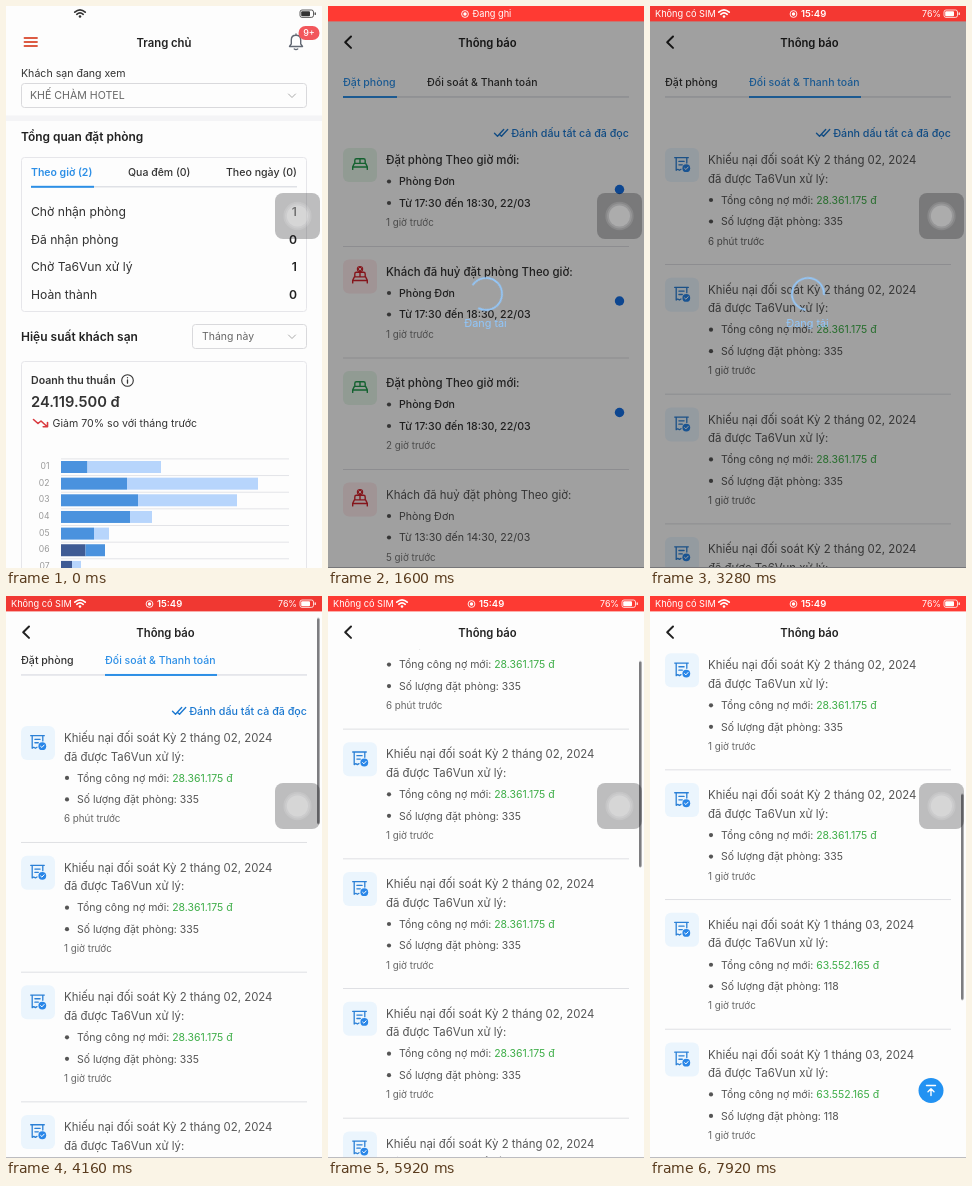
An HTML page that plays this animation: 316 px wide and 562 px high, repeating every 8000 ms.

```html
<!DOCTYPE html>
<html lang="vi">
<head>
<meta charset="utf-8">
<title>Thông báo</title>
<style>
@property --s { syntax: "<number>"; inherits: true; initial-value: 0; }
html, body { margin: 0; width: 100%; height: 100%; overflow: hidden; background: #fdfdfd; }
svg { display: block; width: 316px; height: 562px; font-family: Inter, "Noto Sans", sans-serif; fill: #333; animation: scroll 8s linear infinite; }
svg g, svg rect, svg text { animation: 0s linear infinite; }
.line { fill: none; stroke-linecap: round; stroke-linejoin: round; }

svg .home { animation: home 8s infinite; }
svg .page { animation: page 8s infinite; }
svg .feed { transform: translateY(calc(var(--s) * -1px)); }
svg .thumb { transform: translateY(calc(var(--s) * .381px)); animation: thumb 8s step-end infinite; }
svg .bookings { animation: bookings 8s step-end infinite; }
svg .claims { animation: claims 8s step-end infinite; }
svg .veil { animation: veil 8s step-end infinite; }
svg .ring { transform-origin: 158px 288px; animation: spin 1s linear infinite; }
svg .tab1 { animation: tab1 8s linear infinite; }
svg .tab2 { animation: tab2 8s linear infinite; }
svg .ink { animation: ink 8s infinite; }
svg .bar { animation: bar 8s ease-in-out infinite; }
svg .plain { animation: plain 8s linear infinite; }
svg .rec { animation: rec 8s linear infinite; }
svg .clock { animation: clock 8s step-end infinite; }
svg .top { animation: top 8s step-end infinite; }

@keyframes scroll {
  0%, 48% { --s: 0; }
  52% { --s: 12; animation-timing-function: cubic-bezier(.4,.22,.72,.62); }
  74% { --s: 125.2; }
  85% { --s: 292.4; }
  99% { --s: 473.6; }
  100% { --s: 486; }
}
@keyframes home {
  0%, 8% { transform: none; animation-timing-function: ease-out; }
  12.5%, 100% { transform: translateX(-95px); }
}
@keyframes page {
  0%, 8% { transform: translateX(316px); animation-timing-function: ease-out; }
  12.5%, 100% { transform: none; }
}
@keyframes thumb { 0% { opacity: 0; } 47% { opacity: 1; } }
@keyframes bookings { 0% { opacity: 0; } 15% { opacity: 1; } 36%, 100% { opacity: 0; } }
@keyframes claims { 0% { opacity: 0; } 41%, 100% { opacity: 1; } }
@keyframes veil { 0% { opacity: 0; } 13% { opacity: 1; } 21.5% { opacity: 0; } 36% { opacity: 1; } 43%, 100% { opacity: 0; } }
@keyframes spin { to { transform: rotate(360deg); } }
@keyframes tab1 { 0%, 34% { fill: #2d8fe6; } 37%, 100% { fill: #333; } }
@keyframes tab2 { 0%, 31% { fill: #333; } 33%, 100% { fill: #2d8fe6; } }
@keyframes ink {
  0%, 34% { x: 15px; width: 54px; animation-timing-function: ease-in-out; }
  37%, 100% { x: 99px; width: 112px; }
}
/* white at first, then the red of a running recording, pulsing */
@keyframes bar {
  0%, .9% { fill: #fdfdfd; }
  7%, 20%, 46%, 72%, 98%, 100% { fill: #ff3a33; }
  33%, 59%, 85% { fill: #dc3531; }
}
@keyframes plain { 0%, .9% { opacity: 1; } 5%, 100% { opacity: 0; } }
@keyframes rec { 0%, 2% { opacity: 0; } 6%, 35.9% { opacity: 1; } 36%, 100% { opacity: 0; } }
@keyframes clock { 0% { opacity: 0; } 36%, 100% { opacity: 1; } }
@keyframes top { 0% { opacity: 0; } 90%, 100% { opacity: 1; } }
</style>
</head>
<body>
<svg id="stage" viewBox="0 0 316 562"></svg>
<script>
const BLUE = '#2d8fe6', LINK = '#1b78d0', GREY = '#555', GREEN = '#3fae49';

// y is the middle of the capitals
const text = (x, y, size, str, attrs = '') =>
  `<text x="${x}" y="${(y + size * .36).toFixed(2)}" font-size="${size}" ${attrs}>${str}</text>`;
const rect = (x, y, w, h, fill, attrs = '') =>
  `<rect x="${x}" y="${y}" width="${w}" height="${h}" fill="${fill}" ${attrs}/>`;
const disc = (x, y, r, fill, attrs = '') =>
  `<circle cx="${x}" cy="${y}" r="${r}" fill="${fill}" ${attrs}/>`;
const line = (d, stroke, w = 1, attrs = '') =>
  `<path class="line" d="${d}" stroke="${stroke}" stroke-width="${w}" ${attrs}/>`;
const group = (cls, ...parts) => `<g class="${cls}">${parts.join('')}</g>`;
const move = (x, y, ...parts) => `<g transform="translate(${x} ${y})">${parts.join('')}</g>`;
const box = (x, y, w, h, stroke) => rect(x + .5, y + .5, w, h, 'none', `rx="3" stroke="${stroke}"`);
const W5 = 'font-weight="500"', W6 = 'font-weight="600"', END = 'text-anchor="end"', MID = 'text-anchor="middle"';

const wifi = c => line('M68.8 6.2q5.2-4.6 10.4 0M70.8 8.3q3.2-2.8 6.4 0', c, 1.7) + disc(74, 10.5, 1.3, c);
const battery = c => rect(294, 4, 13.5, 7.4, 'none', `rx="2" stroke="${c}" stroke-width=".8"`) +
  rect(295.2, 5.2, 8.8, 5, c, 'rx="1"') + rect(308.6, 6.3, 1.2, 2.8, c, 'rx=".6"');
const record = x => disc(x, 8, 3.4, 'none', 'stroke="#fff" stroke-width=".9"') + disc(x, 8, 1.7, '#fff');

function home() {
  const rows = [['Chờ nhận phòng', 1], ['Đã nhận phòng', 0], ['Chờ Ta6Vun xử lý', 1], ['Hoàn thành', 0]];
  // start colour end, then second colour end
  const bars = [[81.5, 155], [121, 252], [132, 231], [124, 146], [88, 103], [79.5, 99], [66, 75]];
  const dark = '#3f5b94', mid = '#4a92de', pale = '#b7d5fc';
  return group('home',
    rect(0, 0, 316, 562, '#fdfdfd'),
    line('M18.5 32h12.5M18.5 36h12.5M18.5 40h12.5', '#dc5b43', 1.8),
    text(158, 36.5, 11.3, 'Trang chủ', `${W6} ${MID} fill="#222"`),
    line('M283.5 40.5h13l-1.8-2.6v-4q0-4.6-4.7-4.6t-4.7 4.6v4zM288.3 43q1.7 1.3 3.4 0M290 29.3v-1.3', '#626873', 1.4),
    rect(292.5, 20, 21, 14, '#f2575c', 'rx="7"'),
    text(303, 27, 9, '9+', `${MID} ${W5} fill="#fff"`),
    text(15, 67.5, 10.6, 'Khách sạn đang xem'),
    box(15, 77, 285, 24, '#d9d9dc'),
    text(24, 89.5, 10.6, 'KHẾ CHÀM HOTEL', 'fill="#666"'),
    line('M282.5 88l3.5 3.5 3.5-3.5', '#aaa'),
    rect(0, 109.5, 316, 5.5, '#f4f4f6'),
    text(15, 131, 11.95, 'Tổng quan đặt phòng', `${W6} fill="#222"`),
    box(15, 151, 285, 154, '#e6e6ea'),
    text(25, 166.5, 10.5, 'Theo giờ (2)', `${W6} fill="${BLUE}"`),
    text(122, 166.5, 10.5, 'Qua đêm (0)', W5),
    text(291, 166.5, 10.6, 'Theo ngày (0)', `${W5} ${END}`),
    rect(25, 180, 266, 1.5, '#dfe1e6'),
    rect(25, 179.8, 63, 2, BLUE),
    ...rows.map(([label, n], i) => text(25, 206 + 27.4 * i, 12.15, label) +
      text(291, 206 + 27.4 * i, 12.15, n, `${W6} ${END} fill="#222"`)),
    text(15, 331, 12, 'Hiệu suất khách sạn', `${W6} fill="#222"`),
    box(186, 318, 114, 24, '#d9d9dc'),
    text(196, 330.5, 10.45, 'Tháng này', 'fill="#666"'),
    line('M282.5 329l3.5 3.5 3.5-3.5', '#aaa'),
    box(15, 355, 285, 240, '#e6e6ea'),
    text(25, 374.5, 10.6, 'Doanh thu thuần', W6),
    disc(121.5, 374.5, 5.8, 'none', 'stroke="#333" stroke-width="1.1"'),
    line('M121.5 374v3.2M121.5 371.6v.1', '#333', 1.3),
    text(25, 396, 14.7, '24.119.500 đ', W6),
    line('M27.5 413.5l4.5 4 3-2.5 6 5.5M41.5 416.5v4.3h-4.3', '#d93a3f', 1.6),
    text(46.5, 417.5, 10.6, 'Giảm 70% so với tháng trước'),
    ...bars.map(([a, b], i) => {
      const y = 461 + 16.65 * i, deep = i > 4;
      return rect(55, y - 8.6, 228, 1, '#e3e4e8') +
        text(43.5, y - 1, 8.6, '0' + (i + 1), `${END} fill="#999"`) +
        rect(55, y - 6, a - 55, 12, deep ? dark : mid) +
        rect(a, y - 6, b - a, 12, i === 5 ? mid : pale);
    }));
}

const bullet = (y, str, attrs, size = 10.6) => disc(61, y, 2.1, GREY) + text(71, y, size, str, attrs);
const rule = y => rect(15, y, 286, 1, '#dfe0e4');

function bed(cancelled) {
  const c = cancelled ? '#d3222c' : '#1f9a4b', y = cancelled ? 2 : 0;
  const shape = line('M26.8 3.4v-3q0-1.6 1.6-1.6h7.2q1.6 0 1.6 1.6v3M32 -1.2v4.4M24.7 9.4v-2.6l1.7-3.4h11.2l1.7 3.4v2.6M24.7 7h14.6', c, 1.4);
  const cross = disc(32, -4.4, 3.2, c) + line('M30.9 -5.5l2.2 2.2M33.1 -5.5l-2.2 2.2', '#fff', .9);
  return rect(15, -12, 34, 34, cancelled ? '#fdeaec' : '#e6f5e9', 'rx="6"') + move(0, y, shape, cancelled ? cross : '');
}

function booking(i) {
  const cancelled = i % 2 === 1, unread = i < 3;
  const look = unread ? W5 : `fill="${GREY}"`;
  return move(0, 154 + 111.5 * i,
    bed(cancelled),
    text(58, 0, 11.4, cancelled ? 'Khách đã huỷ đặt phòng Theo giờ:' : 'Đặt phòng Theo giờ mới:', look),
    bullet(21.5, 'Phòng Đơn', look, 10.6),
    bullet(43, `Từ ${unread ? '17:30 đến 18:30' : '13:30 đến 14:30'}, 22/03`, look, 10.65),
    text(58, 62.5, 9.8, `${[1, 1, 2, 5][i]} giờ trước`, 'fill="#777"'),
    unread ? disc(291.5, 29.5, 4.7, '#166fe5') : '',
    rule(86));
}

const receipt = rect(15, -12, 34, 34, '#ebf5fd', 'rx="6"') +
  line('M24.7 -2.3h13.6M26.2 -2.3v12.6l1.6-1 1.6 1 1.6-1M36.8 -2.3v5.3M28.9 1.4h5.2M28.9 4.8h3.4', '#2b80d6', 1.3) +
  disc(36.3, 8.2, 3.9, '#2986e8') + line('M34.6 8.3l1.3 1.2 2.2-2.4', '#fff', 1);

function claim(i) {
  const late = i > 4, fill = `fill="${GREY}"`;
  return move(0, 154 + 129.7 * i,
    receipt,
    text(58, 0, 11.4, `Khiếu nại đối soát Kỳ ${late ? '1 tháng 03' : '2 tháng 02'}, 2024`, fill),
    text(58, 18.5, 11.4, 'đã được Ta6Vun xử lý:', fill),
    bullet(40, `Tổng công nợ mới: <tspan fill="${GREEN}">${late ? '63.552.165' : '28.361.175'} đ</tspan>`, fill, 10.5),
    bullet(61.5, `Số lượng đặt phòng: ${late ? 118 : 335}`, fill, 10.5),
    text(58, 81, 9.8, i ? '1 giờ trước' : '6 phút trước', 'fill="#666"'),
    rule(104));
}

const each = (n, fn) => Array.from({ length: n }, (_, i) => fn(i)).join('');

function page() {
  return group('page',
    rect(0, 0, 316, 562, '#fdfdfd'),
    '<clipPath id="body"><rect y="53" width="316" height="509"/></clipPath><g clip-path="url(#body)">',
    group('feed',
      text(15, 76.5, 10.6, 'Đặt phòng', `${W5} class="tab1"`),
      text(99, 76.5, 10.5, 'Đối soát &amp; Thanh toán', `${W5} class="tab2"`),
      rect(15, 90.2, 286, 1.5, '#e0e2e7'),
      rect(15, 90, 54, 2, BLUE, 'class="ink"'),
      line('M166.5 127.2l3 3 6.2-6.7M172.3 129l1.2 1.2 6.2-6.7', LINK, 1.4),
      text(301, 127, 10.7, 'Đánh dấu tất cả đã đọc', `${W5} ${END} fill="${LINK}"`),
      group('bookings', each(4, booking)),
      group('claims', each(8, claim))),
    '</g>',
    line('M23 30.5l-5.8 5.7 5.8 5.7', '#222', 2),
    text(159.5, 36.5, 11.25, 'Thông báo', `${W6} ${MID} fill="#222"`),
    rect(311, 17.4, 2.6, 206, '#7d7d80', 'rx="1.3" class="thumb"'),
    group('top', disc(281, 494.5, 12.5, '#2292f2'),
      line('M276.5 489.5h9M281 499.5v-6.5M278 495.7l3-3 3 3', '#fff', 1.4)),
    rect(0, 561, 316, 1, '#bcbcc0'));
}

const veil = group('veil',
  rect(0, 15, 316, 547, '#000', 'opacity=".37"'),
  // open at the lower left when upright
  group('ring', disc(158, 288, 16, 'none', 'stroke="#93c7fa" stroke-width="1.8" stroke-dasharray="72 29" stroke-linecap="round"')),
  text(157.5, 317, 10.8, 'Đang tải', `${MID} fill="#8fc5fa"`));

const status = rect(0, 0, 316, 15.4, '#fdfdfd', 'class="bar"') +
  group('plain', wifi('#333'), battery('#333')) +
  group('rec', record(137), text(144.5, 8, 9.2, 'Đang ghi', 'fill="#fff"')) +
  group('clock',
    text(5, 8, 9.2, 'Không có SIM', 'fill="#fff"'), wifi('#fff'),
    record(143.5), text(151, 8, 9.5, '15:49', `${W6} fill="#fff"`),
    text(291, 8, 8.8, '76%', `${END} fill="#fff"`), battery('#fff'));

const touch = rect(269, 187, 45, 46, '#141418', 'rx="8" opacity=".27"') +
  disc(291.5, 210, 14.2, '#fff', 'opacity=".11"') +
  disc(291.5, 210, 12.4, '#fff', 'opacity=".13"') +
  disc(291.5, 210, 10.6, '#fff', 'opacity=".2"');

document.getElementById('stage').innerHTML = home() + page() + veil + status + touch;
</script>
</body>
</html>
```
